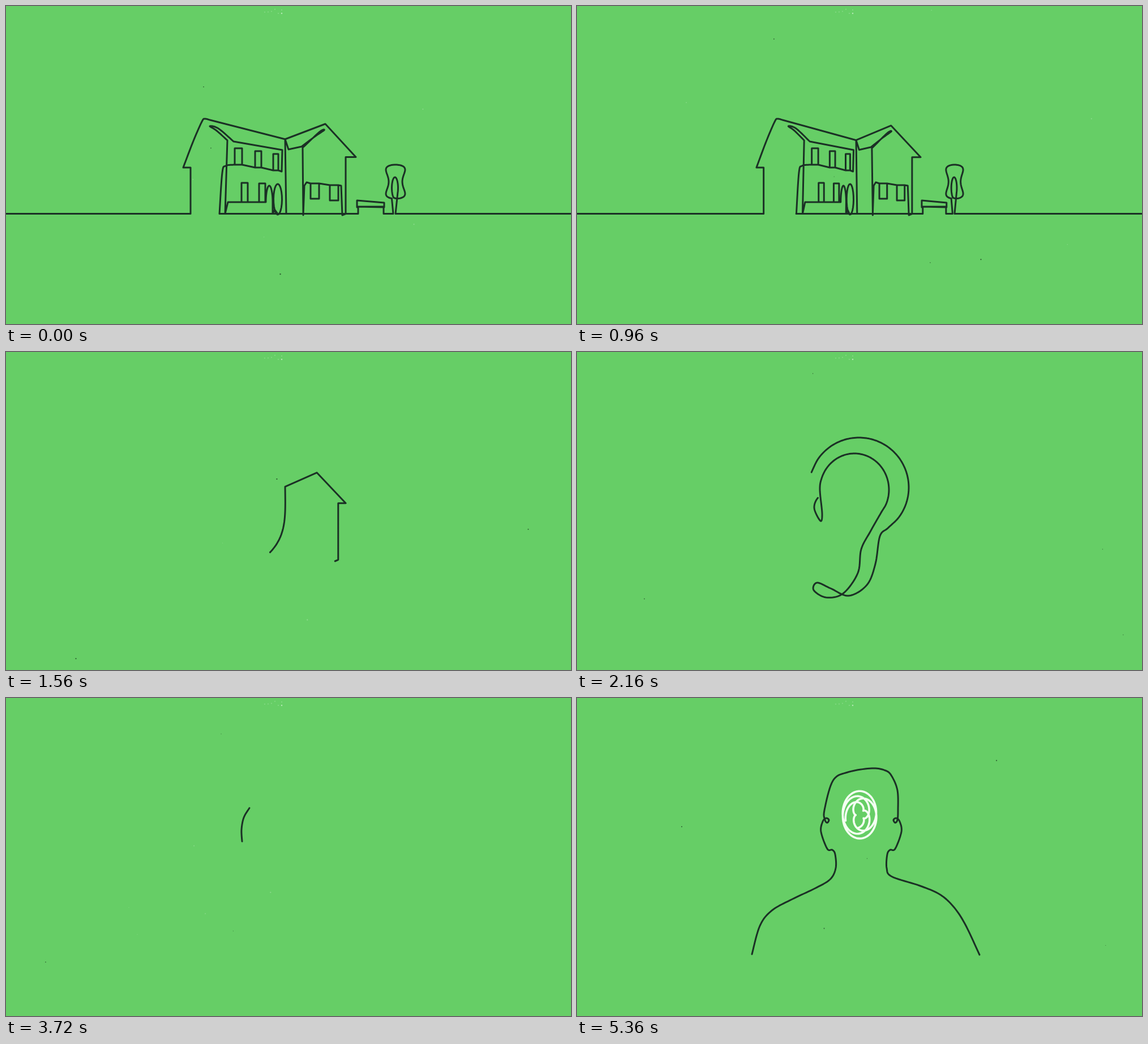
An HTML page with a canvas that plays this animation: 998x561 px, repeating every 5400 ms.

```html
<!DOCTYPE html>
<html lang="en">
<head>
<meta charset="utf-8">
<title>One line</title>
<style>
html, body { margin: 0; width: 100%; height: 100%; overflow: hidden; background: #66ce66; }
canvas { display: block; width: 998px; height: 561px; }
</style>
</head>
<body>
<canvas id="stage" width="998" height="561"></canvas>
<script>
const ctx = document.getElementById('stage').getContext('2d');
const LOOP = 5400, STEP = 40, PI = Math.PI, GROUND = 366.6;

const clamp = v => Math.max(0, Math.min(1, v));
const ramp = (t, from, to) => clamp((t - from) / (to - from));
const ease = u => u < .5 ? 2 * u * u : 1 - 2 * (1 - u) * (1 - u);
const easeOut = u => 1 - (1 - u) * (1 - u);
const mix = (a, b, u) => a + (b - a) * u;
const mixPt = (p, q, u) => [mix(p[0], q[0], u), mix(p[1], q[1], u)];

function points(...list) {
  const out = [];
  for (let i = 0; i < list.length; i += 2) out.push([list[i], list[i + 1]]);
  return out;
}

// n + 1 samples of a formula f(u), u from 0 to 1
const trace = (n, f) => Array.from({ length: n + 1 }, (_, i) => f(i / n));

const ellipse = (cx, cy, rx, ry, from, to, n = 24) => trace(n, u => {
  const a = mix(from, to, u);
  return [cx + rx * Math.cos(a), cy + ry * Math.sin(a)];
});

// Catmull-Rom spline through the given points
function curve(p, n = 10) {
  const out = [p[0]], last = p.length - 1;
  for (let i = 0; i < last; i++) {
    const a = p[Math.max(0, i - 1)], b = p[i], c = p[i + 1], d = p[Math.min(last, i + 2)];
    for (let j = 1; j <= n; j++) {
      const u = j / n;
      out.push([0, 1].map(k => b[k] + .5 * u * (c[k] - a[k] +
        u * (2 * a[k] - 5 * b[k] + 4 * c[k] - d[k] + u * (3 * (b[k] - c[k]) + d[k] - a[k])))));
    }
  }
  return out;
}

function lengths(pts) {
  const len = [0];
  for (let i = 1; i < pts.length; i++)
    len.push(len[i - 1] + Math.hypot(pts[i][0] - pts[i - 1][0], pts[i][1] - pts[i - 1][1]));
  return len;
}

const total = pts => lengths(pts).pop();

// Piece of a line between two distances along it
function cut(pts, a, b) {
  const len = lengths(pts), out = [];
  for (let i = 1; i < pts.length; i++) {
    if (len[i] < a || len[i - 1] > b || len[i] === len[i - 1]) continue;
    const at = d => mixPt(pts[i - 1], pts[i], clamp((d - len[i - 1]) / (len[i] - len[i - 1])));
    if (!out.length) out.push(at(a));
    out.push(at(b));
  }
  return out;
}

function resample(pts, n = 300) {
  const len = lengths(pts), all = len[len.length - 1];
  let i = 1;
  return trace(n, u => {
    while (i < pts.length - 1 && len[i] < all * u) i++;
    return mixPt(pts[i - 1], pts[i], (all * u - len[i - 1]) / (len[i] - len[i - 1] || 1));
  });
}

function morph(a, b, u) {
  if (u <= 0) return a;
  if (u >= 1) return b;
  const q = resample(b);
  return resample(a).map((p, i) => mixPt(p, q[i], u));
}

// Distance along a line of the point nearest to x, y
function distAt(pts, x, y) {
  const gap = pts.map(p => Math.hypot(p[0] - x, p[1] - y));
  return lengths(pts)[gap.indexOf(Math.min(...gap))];
}

// ---- house: one continuous line, each part with its own depth ----
const plan = [];
const add = (depth, pts) => pts.forEach(p => plan.push([p[0], p[1], depth]));
const poly = (depth, ...list) => add(depth, points(...list));

// Window hanging on the line at x, y; ends on the far side
const pane = (depth, x, y, w, h) =>
  poly(depth, x, y, x, y + h, x + w, y + h, x + w, y, x, y, x + w, y);

// left gable and roof
poly(.22, -40, GROUND, 326, GROUND, 326, 285, 313, 285);
add(.22, curve(points(313, 285, 331, 238, 346, 204, 351, 199, 360, 201)));
poly(.22, 493, 235);
// roof underside and inner corner
poly(1, 499, 253, 522, 248);
add(1, curve(points(522, 248, 546, 230, 562, 219, 554, 222, 524, 250)));
poly(.8, 525, 369, 525, GROUND);
// upper floor
poly(.87, 377, GROUND);
add(.9, curve(points(377, GROUND, 382, 294, 388, 282, 404, 280)));
for (let i = 0; i < 3; i++) pane(1.2, 404 + 38 * i - 2 * i * i, 280 + 5 * i, 13 - 2 * i, -29);
poly(1, 487, 292, 488, 254, 402, 239);
add(1, curve(points(402, 239, 375, 216, 360, 212, 372, 220, 391, 237)));
// porch and doors
poly(1.08, 387, GROUND, 392, 346);
for (let i = 0; i < 2; i++) pane(1.4, 416 + 31 * i, 346, 11, i - 34);
add(2, ellipse(465, 346, 6, 29, PI, 2 * PI));
poly(1.9, 471, GROUND);
add(1.8, ellipse(480, 341, 7.5, 27, 2.4, 2.4 + 2 * PI));
poly(1, 480, GROUND);
// right gable
const TAIL = plan.length;
add(1, curve(points(495, GROUND, 494, 300, 493, 235), 20));
const TAIL_END = plan.length;
poly(1.3, 564, 208);
poly(.88, 618, 266.5);
poly(.76, 600, 266.5, 600, GROUND);
const FOOT = plan.length;
poly(.78, 594, 369, 592, 317);
for (let i = 0; i < 2; i++) pane(.88, 587 - 34 * i, 316 - 3 * i, -15, 27);
poly(.85, 531, 311, 527, 317, 525, 369, 525, GROUND);
// bench
poly(.87, 622, GROUND, 622, 355, 620, 355, 620, 343, 668, 347, 668, 355, 622, 354, 667, 354, 667, GROUND);
// tree
poly(1.08, 684, GROUND);
add(1.08, trace(60, u => {
  const a = PI * mix(1.06, 2.98, u);
  return [688 + Math.sin(a) * (12 + 24 * Math.cos(a) ** 2), 310 - 30 * Math.cos(a)];
}));
add(1.08, ellipse(687, 321, 5.5, 19, 2, 2 * PI + .5));
poly(1.08, 688, GROUND, 1300, GROUND);

// The whole house turns slowly: x is squeezed towards the middle corner by depth
function house(t) {
  const turn = t / 960, bend = 24 * ease(ramp(t, 1380, 1560));
  return plan.map(([x, y, depth], i) => {
    const sag = i >= TAIL && i < TAIL_END ? bend * Math.max(0, (y - 238) / 111) ** 4 : 0;
    const drop = x > 492 && y < 270 ? .048 * (270 - y) * turn : 0;
    return [x + (493 - x) * .1 * depth * turn - sag, y + drop];
  });
}

function houseLine(t) {
  const pts = house(t), p = ease(ramp(t, 1040, 1560));
  if (!p) return pts;
  const len = lengths(pts);
  return cut(pts, p * (len[TAIL] + 20), mix(len[len.length - 1], len[FOOT], p));
}

// ---- ear ----
const ear = curve([
  ...ellipse(498, 239, 88, 88, PI + .31, 2 * PI + .95, 12),
  ...points(535, 325, 527, 374, 512, 411, 480, 430, 448, 417, 424, 407, 418, 420, 440, 433,
    470, 426, 496, 390, 502, 348, 518, 317),
  ...ellipse(490, 243, 61, 64, .7, -PI, 12),
  ...points(433, 285, 430, 298, 419, 275, 427, 256, 445, 255, 464, 270, 474, 297, 456, 317, 454, 347)
]);

// ---- head: both sides share one profile of neck, jaw and ear ----
const profile = points(45, 300, 46, 276, 51, 268, 60, 266, 71, 236, 68, 218, 62, 212, 57, 215, 60, 220, 64, 215, 65, 198);
const side = dir => profile.map(([x, y]) => [502 + dir * x, y]);
const head = curve([
  ...points(309, 452, 323, 402, 344, 375, 380, 355, 420, 336, 447, 320), ...side(-1),
  ...points(452, 146, 478, 131, 521, 124, 545, 128, 556, 138, 566, 163), ...side(1).reverse(),
  ...points(556, 315, 605, 331, 640, 346, 664, 367, 685, 398, 711, 453)
]);
const arc = curve(points(417, 253, 416, 232, 420, 211, 430, 194));

const earLen = total(ear), headLen = total(head);
const headFrom = distAt(head, 431, 236), headTop = distAt(head, 437, 198), shoulder = distAt(head, 605, 331);
const lastHouse = houseLine(1560);

function headLine(t) {
  const start = mix(headFrom, 0, easeOut(ramp(t, 3720, 4440)));
  const end = t < 4520 ? mix(headTop, shoulder, ramp(t, 3720, 4520))
    : mix(shoulder, headLen, easeOut(ramp(t, 4520, 5100)));
  return cut(head, start, end);
}

function inkLine(t) {
  if (t <= 1560) return houseLine(t);
  if (t < 3000) {
    const grown = mix(.34, 1, easeOut(ramp(t, 1560, 2560)));
    return morph(lastHouse, cut(ear, 0, earLen * grown), ease(ramp(t, 1560, 1960)));
  }
  if (t <= 3720) {
    const rest = cut(ear, 0, mix(earLen, 62, ease(ramp(t, 3000, 3720))));
    return morph(rest, arc, ease(ramp(t, 3480, 3720)));
  }
  return morph(arc, headLine(t), ease(ramp(t, 3720, 4000)));
}

// Scribble: two orbits added up; its end first rises into a small loop, then sinks back
function tangle(t) {
  const turn = ramp(t, 4520, 5360), tall = ease(turn);
  const w = mix(43, 32, tall), h = mix(23, 42, tall);
  const pts = trace(300, u => {
    const a = 2.4 + u * 8 * PI, b = 1.62 * a + 1 + 5 * turn;
    const lift = (1 - tall) * ease(ramp(u, .72, .88)), size = 1 - .7 * lift;
    return [
      mix(504, 500, tall) + 12 * lift + w * size * (.62 * Math.cos(a) + .38 * Math.cos(b)),
      mix(211, 206, tall) - 38 * lift + h * size * (.62 * Math.sin(a) + .38 * Math.sin(b))
    ];
  });
  return cut(pts, 0, total(pts) * ease(ramp(t, 4040, 4480)));
}

// ---- drawing ----
function stroke(pts, color, width) {
  if (pts.length < 2) return;
  ctx.strokeStyle = color;
  ctx.lineWidth = width;
  ctx.beginPath();
  pts.forEach(p => ctx.lineTo(p[0], p[1]));
  ctx.stroke();
}

function speck(x, y, r, color) {
  ctx.fillStyle = color;
  ctx.beginPath();
  ctx.arc(x, y, r, 0, 7);
  ctx.fill();
}

function noise(seed) {
  const v = Math.sin(seed * 127.1 + 11.7) * 43758.5453;
  return v - Math.floor(v);
}

function dust(step) {
  speck(487, 13, 1.2, 'rgba(200,240,200,.8)');
  for (let i = 0; i < 6; i++) speck(457 + 6 * i, 5 + 8 * noise(i), 1, 'rgba(200,240,200,.35)');
  const count = 4 + Math.floor(noise(step) * 6);
  for (let i = 0; i < count; i++) {
    const s = step * 41 + i * 5;
    const color = noise(s + 4) < .6 ? 'rgba(25,55,30,.7)' : 'rgba(190,235,190,.4)';
    speck(35 + noise(s + 1) * 940, noise(s + 2) * 552, .5 + noise(s + 3) * .7, color);
  }
}

function draw(t) {
  ctx.fillStyle = '#66ce66';
  ctx.fillRect(0, 0, 998, 561);
  ctx.lineCap = ctx.lineJoin = 'round';
  dust(Math.round(t / STEP));
  stroke(inkLine(t), '#1b3025', 3);
  if (t > 4040) stroke(tangle(t), '#f4fff2', 3.6);
}

let begin;
function tick(now) {
  if (begin === undefined) begin = now;
  draw(Math.floor((now - begin) % LOOP / STEP) * STEP);
  requestAnimationFrame(tick);
}
draw(0);
requestAnimationFrame(tick);
</script>
</body>
</html>
```
